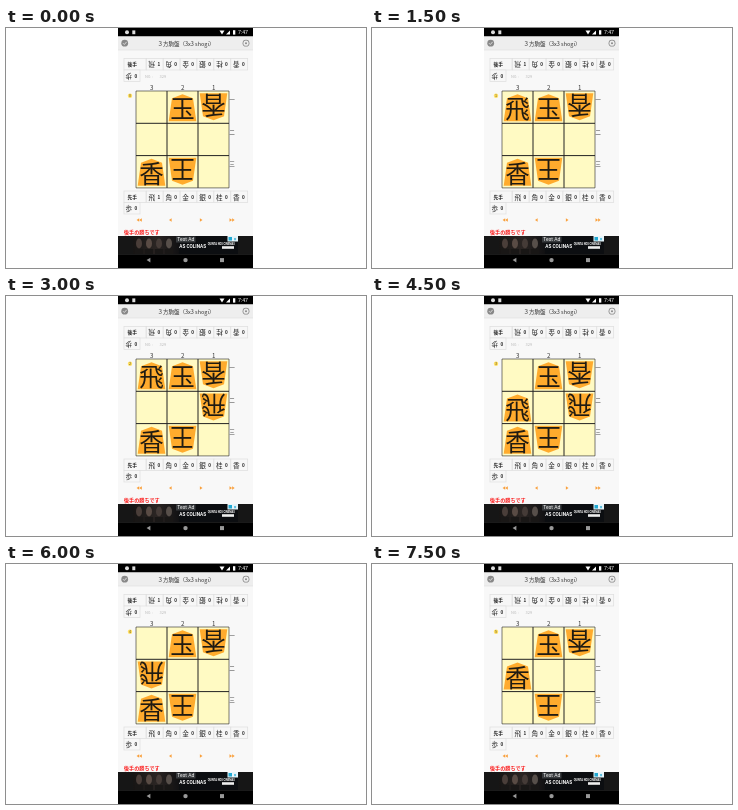
Recreate the animation shown at these times as an HTML page with a canvas. Size 360x240 px, loop 8 s.

```html
<!DOCTYPE html>
<html lang="ja">
<head>
<meta charset="utf-8">
<title>Board replay</title>
<style>
html, body { margin: 0; width: 100%; height: 100%; overflow: hidden; background: #fff; }
canvas { display: block; width: 360px; height: 240px; }
</style>
</head>
<body>
<canvas id="stage"></canvas>
<script>
const canvas = document.getElementById("stage");
const ratio = window.devicePixelRatio || 1;
canvas.width = 360 * ratio;
canvas.height = 240 * ratio;
const ctx = canvas.getContext("2d");
ctx.scale(ratio, ratio);

const CJK = '"Noto Sans CJK JP", "Noto Sans CJK", sans-serif';
const SANS = 'Roboto, sans-serif';
const LOOP = 8000, STEP = 1500;
const BOARD = { x: 130, y: 63, w: 31, h: 32.3 };
const KINDS = "飛角金銀桂香";

// Piece placements: [glyph, column, row, flipped]
const FIXED = [["玉", 1, 0, false], ["香", 2, 0, true], ["王", 1, 2, true]];
const LANCE = ["香", 0, 2, false];
// Pieces that vary per move, and the rooks held by the upper and lower player
const MOVES = [
  { pieces: [LANCE], hands: [1, 1] },
  { pieces: [LANCE, ["飛", 0, 0, false]], hands: [1, 0] },
  { pieces: [LANCE, ["飛", 0, 0, false], ["飛", 2, 1, true]], hands: [0, 0] },
  { pieces: [LANCE, ["飛", 0, 1, false], ["飛", 2, 1, true]], hands: [0, 0] },
  { pieces: [LANCE, ["飛", 0, 1, true]], hands: [1, 0] },
  { pieces: [["香", 0, 1, false]], hands: [1, 1] }
];

function rect(x, y, w, h, color) {
  ctx.fillStyle = color;
  ctx.fillRect(x, y, w, h);
}

function disc(x, y, r, color) {
  ctx.fillStyle = color;
  ctx.beginPath();
  ctx.arc(x, y, r, 0, Math.PI * 2);
  ctx.fill();
}

function poly(points, color) {
  ctx.fillStyle = color;
  ctx.beginPath();
  points.forEach(([x, y]) => ctx.lineTo(x, y));
  ctx.closePath();
  ctx.fill();
}

function line(points, color, width) {
  ctx.strokeStyle = color;
  ctx.lineWidth = width;
  ctx.beginPath();
  points.forEach(([x, y]) => ctx.lineTo(x, y));
  ctx.stroke();
}

function text(str, x, y, size, color = "#222", align = "center", weight = 400, family = CJK) {
  ctx.font = `${weight} ${size}px ${family}`;
  ctx.textAlign = align;
  ctx.textBaseline = "alphabetic";
  ctx.fillStyle = color;
  ctx.fillText(str, x, y);
}

// Runs a drawing around its own centre, upside down when flipped
function placed(x, y, flipped, draw) {
  ctx.save();
  ctx.translate(x, y);
  if (flipped) ctx.rotate(Math.PI);
  draw();
  ctx.restore();
}

function statusBar() {
  rect(112, 0, 135, 8.5, "#000");
  disc(121, 4.3, 2, "#ddd");
  rect(126.3, 2.4, 3, 3.8, "#ddd");
  poly([[213.5, 2.5], [218.5, 2.5], [216, 6.4]], "#fff");
  poly([[220, 6.4], [224, 6.4], [224, 2.4]], "#fff");
  rect(227, 2.2, 2.3, 4.4, "#fff");
  text("7:47", 242, 6.4, 5.2, "#fff", "right", 400, SANS);
}

function titleBar() {
  rect(112, 8.5, 135, 13.5, "#eee");
  line([[112, 22], [247, 22]], "#ddd", 0.6);
  text("３方駒盤（3x3 shogi）", 180, 17.6, 5.5, "#333");
  disc(118.7, 15.2, 3.4, "#888");
  line([[117, 15.2], [118.3, 16.5], [120.6, 13.9]], "#eee", 0.8);
  disc(240, 15.2, 3.4, "#888");
  disc(240, 15.2, 2.6, "#eee");
  disc(240, 15.2, 1, "#888");
}

function cell(x, y, w, h) {
  rect(x, y, w, h, "#f7f7f7");
  ctx.strokeStyle = "#dedede";
  ctx.lineWidth = 0.7;
  ctx.strokeRect(x, y, w, h);
}

function handPiece(glyph, count, x, y, flipped) {
  placed(x, y, flipped, () => text(glyph, 0, 2.5, 6.6));
  text(count, x + 7, y + 1.9, 4.6, "#222", "center", 700);
}

function hand(label, y, rooks, flipped) {
  cell(118, y, 22, 11.5);
  text(label, 126.3, y + 7.8, 4.8, "#222", "center", 700);
  [...KINDS].forEach((glyph, i) => {
    const x = 145.8 + i * 16.9;
    cell(x - 5.5, y, 16.9, 11.5);
    handPiece(glyph, i ? 0 : rooks, x, y + 6, flipped);
  });
  cell(118, y + 11.5, 16, 11.5);
  handPiece("歩", 0, 122.8, y + 17.5, flipped);
}

function piece([glyph, col, row, flipped]) {
  const x = BOARD.x + (col + 0.5) * BOARD.w;
  const y = BOARD.y + (row + 0.5) * BOARD.h;
  placed(x, y, flipped, () => {
    poly([[0, -13], [10.5, -9], [13.8, 14], [-13.8, 14], [-10.5, -9]], "#ffab2d");
    text(glyph, 0, 11.3, 24.5, "#201b12", "center", 500);
  });
}

function board(move) {
  const { x, y, w, h } = BOARD;
  rect(x, y, w * 3, h * 3, "#fffac3");
  for (let i = 0; i < 4; i++) {
    const width = i % 3 ? 1 : 0.6;
    line([[x + i * w, y], [x + i * w, y + h * 3]], "#222", width);
    line([[x, y + i * h], [x + w * 3, y + i * h]], "#222", width);
  }
  for (let i = 0; i < 3; i++) {
    text(3 - i, x + (i + 0.5) * w + 0.3, 61.7, 6.2, "#333");
    text("一二三"[i], 226, y + i * h + 10.7, 5.6, "#333");
  }
  [...FIXED, ...MOVES[move].pieces].forEach(piece);
  disc(124, 67.8, 2.2, "#ffe064");
  text(move, 124, 69.1, 3.6, "#5f4c12");
}

function controls() {
  const arrow = (x, dir) =>
    poly([[x - 1.3 * dir, 190.2], [x + 1.3 * dir, 192], [x - 1.3 * dir, 193.8]], "#f9a03c");
  arrow(131.9, -1);
  arrow(134.5, -1);
  arrow(164.3, -1);
  arrow(195.2, 1);
  arrow(224.8, 1);
  arrow(227.4, 1);
  text("後手の勝ちです", 118, 205.5, 5.1, "#fb2020", "left", 700);
}

function banner() {
  rect(112, 208, 135, 18.5, "#161616");
  const glow = ctx.createLinearGradient(127, 0, 173, 0);
  glow.addColorStop(0, "#171514");
  glow.addColorStop(0.5, "#2b2523");
  glow.addColorStop(1, "#111113");
  rect(127, 208, 46, 18, glow);
  [133, 143, 153, 163].forEach((x, i) => {
    ctx.fillStyle = ["#4a3e39", "#594b44", "#453b37", "#574f4a"][i];
    ctx.beginPath();
    ctx.ellipse(x, 215.5, 3, 5, 0, 0, Math.PI * 2);
    ctx.fill();
    rect(x - 4.2, 221, 8.4, 5, "#191716");
  });
  rect(173, 208, 59, 18, "#0c0e11");
  rect(170, 208.5, 19.5, 6, "#383b3e");
  text("Test Ad", 179.8, 213.3, 5, "#fff", "center", 400, SANS);
  text("AS COLINAS", 173.3, 219.8, 4.7, "#fff", "left", 700, SANS);
  text("QUINTA NOS CINEMAS", 201.8, 217, 2.6, "#fff", "left", 700, SANS);
  rect(216, 218.2, 12, 2.6, "#eee");
  rect(221.5, 208, 10.5, 5.5, "#e8f5fa");
  rect(222.5, 209, 3.5, 3.5, "#22a9d2");
  text("×", 229, 212.6, 5, "#22a9d2", "center", 700, SANS);
}

function navBar() {
  rect(112, 226.2, 135, 13.8, "#000");
  poly([[140.6, 232.1], [144.4, 229.8], [144.4, 234.4]], "#999");
  disc(179.5, 232.1, 2.2, "#999");
  rect(214, 230.1, 4, 4, "#999");
}

function draw(time) {
  const move = Math.min(MOVES.length - 1, Math.floor((time % LOOP) / STEP));
  const [upper, lower] = MOVES[move].hands;
  rect(0, 0, 360, 240, "#fff");
  rect(112, 0, 135, 240, "#f8f8f8");
  statusBar();
  titleBar();
  hand("後手", 30.5, upper, true);
  text("No. :", 139, 49.6, 4, "#bbb", "left");
  text("329", 153.5, 49.6, 4, "#bbb", "left");
  board(move);
  hand("先手", 163, lower, false);
  controls();
  banner();
  navBar();
}

const start = performance.now();
function tick() {
  draw(performance.now() - start);
  requestAnimationFrame(tick);
}
tick();
</script>
</body>
</html>
```
